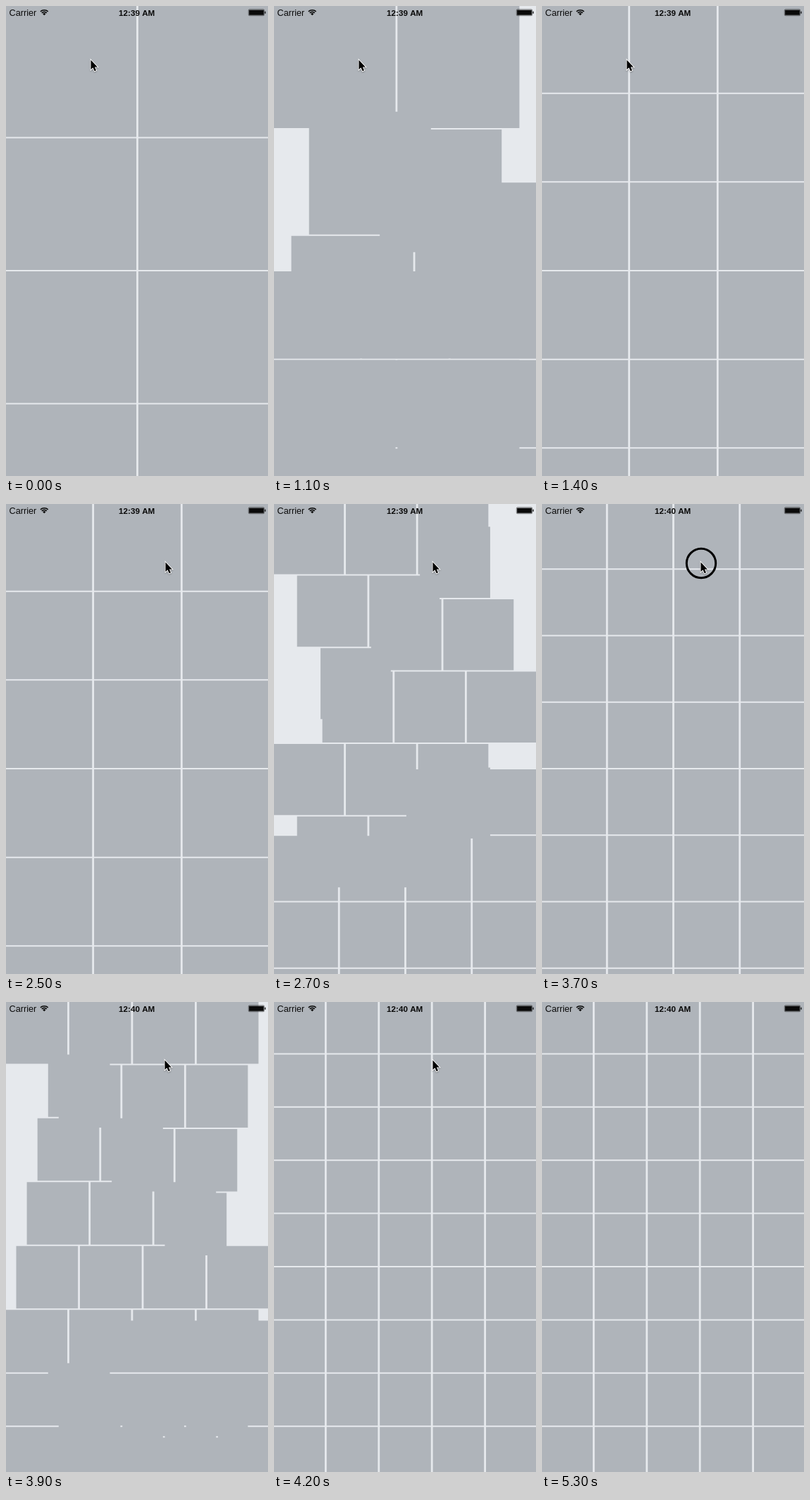
Write an HTML page with a canvas that moves like this. It is 372x666 px and loops after 6.5 s.

```html
<!DOCTYPE html>
<html lang="en">
<head>
<meta charset="utf-8">
<style>
  html, body { margin: 0; width: 100%; height: 100%; overflow: hidden; background: #e6e9ed; }
  canvas { display: block; }
</style>
</head>
<body>
<canvas id="stage" width="372" height="666"></canvas>
<script>
const ctx = document.getElementById('stage').getContext('2d');
const LOOP = 6500, STEP = 100, MOVE = 300;
const WIDTH = 375, HEIGHT = 667, GAP = 2, SIDE_INSET = 0.4;
const CELL = '#afb4ba', BACK = '#e6e9ed', INK = '#0a0a0a';

const changes = [
  { start: 1007, from: 2, to: 3 },
  { start: 2507, from: 3, to: 4 },
  { start: 3807, from: 4, to: 5 },
];
const clicks = [900, 2400, 3700];
// [time, x, y] of the pointer tip
const pointerStops = [
  [0, 120.5, 76.5], [1700, 195, 79], [1800, 252.5, 81.5],
  [2100, 240, 82], [2200, 230, 82.5], [2300, 226.5, 82.5], [2600, 225.5, 82.5],
];
const POINTER_GONE = 5300, MINUTE_TURN = 3700;
const arrow = new Path2D('M0 0V13.6L3 10.8L5.2 15.8L7.5 14.8L5.4 9.9H9.4Z');

// Ease-in-out, cubic-bezier(.42, 0, .58, 1)
function ease(x) {
  if (x <= 0 || x >= 1) return x <= 0 ? 0 : 1;
  let low = 0, high = 1;
  for (let i = 0; i < 24; i++) {
    const s = (low + high) / 2;
    if (1.26 * s - 0.78 * s * s + 0.52 * s ** 3 < x) low = s; else high = s;
  }
  return low * low * (3 - 2 * low);
}

const pitch = columns => (WIDTH + GAP) / columns;
const visibleCount = columns => columns * Math.ceil(HEIGHT / pitch(columns));

function cellAt(index, columns) {
  const p = pitch(columns);
  return [index % columns * p, Math.floor(index / columns) * p, p - GAP];
}

function drawGrid(time) {
  const change = changes.filter(c => time >= c.start).pop() || { start: 0, from: 2, to: 2 };
  const progress = ease((time - change.start) / MOVE);
  const moving = visibleCount(change.from);
  // One shared path keeps the soft edges of overlapping cells from adding up.
  const cells = new Path2D();
  for (let i = 0; i < visibleCount(change.to); i++) {
    const end = cellAt(i, change.to);
    // Cells that were below the screen appear in place.
    const begin = i < moving ? cellAt(i, change.from) : end;
    const [x, y, size] = begin.map((v, k) => v + (end[k] - v) * progress);
    cells.rect(x - 1 + SIDE_INSET, y - 1, size - 2 * SIDE_INSET, size);
  }
  ctx.fillStyle = CELL;
  ctx.fill(cells);
}

function drawWifi(x, y) {
  const from = -Math.PI * 0.75, to = -Math.PI * 0.25;
  ctx.lineWidth = 1.6;
  for (const radius of [7.6, 4.9]) {
    ctx.beginPath();
    ctx.arc(x, y, radius, from, to);
    ctx.stroke();
  }
  ctx.beginPath();
  ctx.moveTo(x, y);
  ctx.arc(x, y, 3, from, to);
  ctx.fill();
}

function drawBattery() {
  ctx.lineWidth = 0.5;
  ctx.beginPath();
  ctx.roundRect(344.3, 4.8, 22.4, 8.9, 1.5);
  ctx.stroke();
  ctx.fillRect(345.1, 5.7, 20.8, 7.1);
  ctx.fillRect(367.3, 7.7, 1.3, 3);
}

function drawStatus(time) {
  ctx.fillStyle = ctx.strokeStyle = INK;
  ctx.textAlign = 'left';
  ctx.font = '12.7px "Liberation Sans", sans-serif';
  ctx.fillText('Carrier', 4.5, 13.7);
  ctx.textAlign = 'center';
  ctx.font = 'bold 11.7px "Liberation Sans", sans-serif';
  ctx.fillText(time < MINUTE_TURN ? '12:39 AM' : '12:40 AM', 185.7, 13.7);
  drawWifi(54.3, 13.3);
  drawBattery();
}

function drawPointer(time) {
  if (time >= POINTER_GONE) return;
  const [, x, y] = pointerStops.filter(stop => time >= stop[0]).pop();
  if (clicks.includes(time)) {
    ctx.strokeStyle = '#000';
    ctx.lineWidth = 3;
    ctx.beginPath();
    ctx.arc(x + 0.5, y + 1.5, 20.7, 0, Math.PI * 2);
    ctx.stroke();
  }
  ctx.save();
  ctx.translate(x, y);
  ctx.shadowColor = 'rgba(0, 0, 0, .3)';
  ctx.shadowBlur = 2;
  ctx.shadowOffsetY = 1;
  ctx.strokeStyle = '#fff';
  ctx.lineWidth = 1.8;
  ctx.stroke(arrow);
  ctx.shadowColor = 'transparent';
  ctx.fillStyle = '#000';
  ctx.fill(arrow);
  ctx.restore();
}

function draw() {
  const time = Math.floor(performance.now() % LOOP / STEP) * STEP;
  ctx.fillStyle = BACK;
  ctx.fillRect(0, 0, 372, 666);
  drawGrid(time);
  drawStatus(time);
  drawPointer(time);
  requestAnimationFrame(draw);
}
draw();
</script>
</body>
</html>
```
